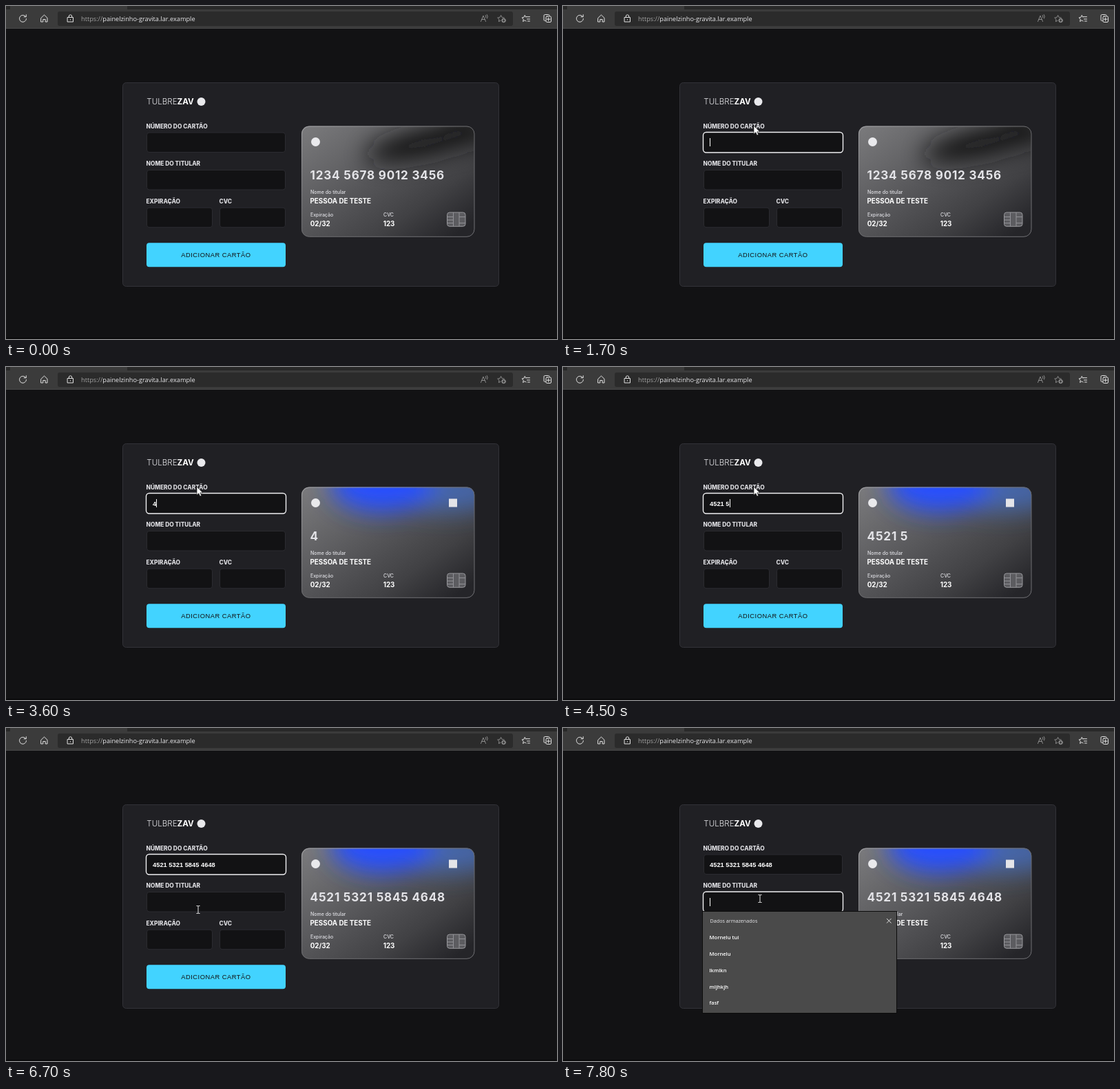
Animation, 800 px wide and 484 px high, one loop 8 s. Source, as an HTML page:

```html
<!DOCTYPE html>
<html lang="pt-BR">
<head>
<meta charset="utf-8">
<title>Formulário de cartão</title>
<style>
  html, body { margin: 0; width: 100%; height: 100%; overflow: hidden; background: #121214; }
  svg { display: block; width: 100vw; height: 100vh; }
  text { font-family: Inter, sans-serif; fill: #e9e9ec; white-space: pre; }
  .browser text { font-family: "Open Sans", "Noto Sans", sans-serif; }
  .label text { font-size: 8.4px; font-weight: 800; fill: #dcdce0; }
  .caption { font-size: 7px; font-weight: 500; fill: #e1e1e6; }
  .value { font-size: 9.8px; font-weight: 700; fill: #fff; }
  #cardNumber { font-size: 17.1px; font-weight: 700; letter-spacing: .78px; fill: #e4e4e8; }
  #typed { font: bold 9.33px "Liberation Sans", Arial, sans-serif; fill: #fff; }
  .button { font: 9.33px "Liberation Sans", Arial, sans-serif; letter-spacing: .5px; fill: #121214; }
  .icon { fill: none; stroke: #e2e2e2; stroke-width: 1; stroke-linecap: round; stroke-linejoin: round; }
  .dim { stroke: #8c8c8c; }
  .field { fill: #121214; stroke: #2b2b30; }
  .option { font-size: 7.6px; font-weight: 600; fill: #fff; }
</style>
</head>
<body>
<svg viewBox="0 0 800 484" preserveAspectRatio="none">
  <defs>
    <linearGradient id="metal" gradientUnits="userSpaceOnUse" x1="429" y1="175" x2="580" y2="385">
      <stop offset="0" stop-color="#7b7b7d"/>
      <stop offset=".5" stop-color="#545457"/>
      <stop offset=".75" stop-color="#414144"/>
      <stop offset="1" stop-color="#252529"/>
    </linearGradient>
    <linearGradient id="edge" x1="0" y1="0" x2="1" y2="1">
      <stop offset="0" stop-color="#a6a6a9"/>
      <stop offset=".5" stop-color="#69696c"/>
      <stop offset="1" stop-color="#707074"/>
    </linearGradient>
    <filter id="blur" x="-60%" y="-120%" width="220%" height="340%"><feGaussianBlur stdDeviation="17"/></filter>
    <clipPath id="cardShape"><rect x="429" y="174.5" width="251" height="161" rx="11"/></clipPath>
  </defs>

  <rect width="800" height="484" fill="#121214"/>
  <rect y="482" width="800" height="2" fill="#0b0b0c"/>

  <g class="browser">
    <rect width="800" height="33" fill="#3b3b3b"/>
    <path d="M0 0H6V5H0ZM176 0H800V5H176Z" fill="#292929"/>
    <rect y="32" width="800" height="1" fill="#484848"/>
    <rect x="75" y="8" width="661" height="21" rx="3" fill="#2b2b2b"/>
    <text x="109" y="21.6" font-size="9.2" font-weight="500" fill="#fff"><tspan font-weight="400" fill="#a0a0a0">https://</tspan>painelzinho-gravita.lar.example</text>
    <g class="icon">
      <path d="M28.6 15.4A5 5 0 1 0 29.5 18.5M29.3 12.7V15.8H26.2"/>
      <path d="M51 17.3L55.5 13L60 17.3V23H57.2V19.5H53.8V23H51Z"/>
      <path d="M89.5 16.5H97.5V23H89.5ZM91.3 16.5V15A2.2 2.2 0 0 1 95.7 15V16.5M93.5 19.5V20"/>
      <path d="M755 15.7H760.5M756.5 19H760.5M757.5 22H760.5M755.2 22L753.2 20.8L750.6 22.5L751.3 19.2L749 17L752 16.4L753.3 13.4L754.6 16"/>
      <path d="M783.5 21.5H782.5Q781 21.5 781 20V14Q781 12.5 782.5 12.5H787.5Q789 12.5 789 14M785.5 15H790Q791.5 15 791.5 16.5V22Q791.5 23.5 790 23.5H785.5Q784 23.5 784 22V16.5Q784 15 785.5 15ZM787.7 17V21.5M785.5 19.2H790"/>
    </g>
    <g class="icon dim">
      <path d="M689.5 22.5L693 14L696.5 22.5M690.7 19.5H695.3M696.3 13.5Q697.5 15 696.6 16.8M698.3 12.5Q700.4 15 698.6 18"/>
      <path d="M718 21.2L715.4 22.7L716 19.4L713.7 17.1L717 16.6L718.6 13.5L720.2 16.6L723.3 17.1"/>
      <circle cx="722.6" cy="21" r="2.8" fill="#8c8c8c"/>
      <path d="M721.2 21H724M722.6 19.6V22.4" stroke="#2b2b2b"/>
    </g>
  </g>

  <rect x="169.5" y="111.5" width="546" height="296" rx="5" fill="#202024" stroke="#323238"/>
  <text x="204.3" y="143" font-size="11.6" font-weight="300" fill="#a9a9ae">TULBRE<tspan font-weight="700" fill="#fff">ZAV</tspan></text>
  <circle cx="283.5" cy="139" r="6" fill="#e9e9ec"/>

  <g class="label">
    <text x="203.5" y="177.6">NÚMERO DO CARTÃO</text>
    <text x="203.5" y="232.2">NOME DO TITULAR</text>
    <text x="203.5" y="286.8">EXPIRAÇÃO</text>
    <text x="309.5" y="286.8">CVC</text>
  </g>
  <rect class="field" x="204.5" y="184" width="201" height="28.5" rx="3.5"/>
  <rect class="field" x="204.5" y="238.5" width="201" height="28.5" rx="3.5"/>
  <rect class="field" x="204.5" y="293.2" width="95" height="28.5" rx="3.5"/>
  <rect class="field" x="310.5" y="293.2" width="95" height="28.5" rx="3.5"/>
  <rect id="focusRing" x="203.5" width="203" height="29.5" rx="4.5" fill="#121214" stroke="#f0f0f2" stroke-width="1.4"/>
  <text id="typed" x="213" y="201.5"></text>
  <rect x="204" y="344.2" width="202" height="35" rx="4" fill="#42d3ff"/>
  <text class="button" x="254.3" y="364.6">ADICIONAR CARTÃO</text>

  <g clip-path="url(#cardShape)">
    <rect x="429" y="174" width="252" height="162" fill="url(#metal)"/>
    <g id="plainGlow" filter="url(#blur)" fill="#131316">
      <ellipse cx="608" cy="199" rx="88" ry="20" transform="rotate(-13 608 199)"/>
      <ellipse cx="672" cy="180" rx="40" ry="24" opacity=".7"/>
    </g>
    <g id="blueGlow" filter="url(#blur)">
      <ellipse cx="638" cy="180" rx="82" ry="30" fill="#416bc0" opacity=".8"/>
      <ellipse cx="546" cy="171" rx="74" ry="40" fill="#2650ff"/>
    </g>
  </g>
  <rect x="429.5" y="175" width="250.5" height="160.3" rx="11" fill="none" stroke="url(#edge)"/>
  <circle cx="449.5" cy="197.5" r="6.5" fill="#e9e9ec"/>
  <rect id="brand" x="643" y="191.5" width="12" height="12" fill="#e4e4e8"/>
  <text id="cardNumber" x="441.6" y="252"></text>
  <text class="caption" x="442" y="273">Nome do titular</text>
  <text class="value" x="441.5" y="287">PESSOA DE TESTE</text>
  <text class="caption" x="442" y="305.6">Expiração</text>
  <text class="value" x="441.7" y="319.8">02/32</text>
  <text class="caption" x="548" y="305.6">CVC</text>
  <text class="value" x="547.7" y="319.8">123</text>
  <rect x="640.5" y="300" width="26.5" height="20.3" rx="3.5" fill="#5c5c60" stroke="#98989c"/>
  <path d="M649.5 300V320M658 300V320M641 306.5H649.5M641 311H649.5M641 315.5H649.5M658 306.5H667M658 315.5H667" fill="none" stroke="#98989c" stroke-width=".9"/>

  <g id="suggestions" class="browser">
    <rect x="202.5" y="266.5" width="282" height="148" fill="#4a4a4a" stroke="#0c0c0c"/>
    <text x="213.5" y="282.8" font-size="7.2" fill="#b4b4b4">Dados armazenados</text>
    <path class="icon" d="M470.3 277.3L476.3 283.3M476.3 277.3L470.3 283.3"/>
    <text class="option" x="212.5" y="307">Mornelu tui</text>
    <text class="option" x="212.5" y="331">Mornelu</text>
    <text class="option" x="212.5" y="355">lkmlkn</text>
    <text class="option" x="212.5" y="378.6">mljhkjh</text>
    <text class="option" x="212.5" y="402.4">fasf</text>
  </g>

  <rect id="caret" width="1" height="12" fill="#fff"/>
  <g id="pointer">
    <path id="arrow" d="M0 0V12.2L2.8 9.6L4.7 13.8L6.7 12.9L4.9 8.8H8.8Z" fill="#fff" stroke="#1a1a1a" stroke-width=".7"/>
    <path id="beam" d="M-2.5 -5.5H-.8L0 -5L.8 -5.5H2.5M0 -5V5M-2.5 5.5H-.8L0 5L.8 5.5H2.5" fill="none" stroke="#e6e6e6"/>
  </g>
</svg>
<script>
  const LOOP = 8000, TICK = 100, BLINK = 500;
  const FOCUS_NUMBER = 700, FOCUS_NAME = 6800, SHOW_LIST = 6900;
  const NUMBER = "4521 5321 5845 4648", PLACEHOLDER = "1234 5678 9012 3456";

  // [time, characters typed so far]
  const keys = [[3600, 1], [3900, 2], [4100, 3], [4300, 4], [4500, 6], [4700, 8], [4800, 9],
    [5200, 12], [5400, 13], [5600, 14], [5700, 17], [5800, 18], [6000, 19]];

  // [time, x, y] of the pointer hotspot
  const path = [[100, 440, 300], [300, 345, 248], [600, 264.5, 193], [1100, 264.5, 193],
    [1300, 277, 174], [6300, 277, 174], [6400, 278, 190], [6600, 279, 250], [6700, 279, 264],
    [6800, 281, 256], [7000, 284, 250], [7100, 284, 250], [7300, 286, 248]];

  const fields = [[204, 184, 406, 212], [204, 238, 406, 267], [204, 293, 300, 322], [310, 293, 406, 322]];

  const el = id => document.getElementById(id);
  const show = (id, visible) => el(id).setAttribute("visibility", visible ? "visible" : "hidden");
  const place = (id, x, y) => {
    el(id).setAttribute("x", x);
    el(id).setAttribute("y", y);
  };

  function pointerAt(t) {
    const next = path.findIndex(p => p[0] > t);
    if (next < 0) return path[path.length - 1].slice(1);
    if (next === 0) return path[0].slice(1);
    const [t0, x0, y0] = path[next - 1], [t1, x1, y1] = path[next];
    const k = (t - t0) / (t1 - t0);
    return [x0 + (x1 - x0) * k, y0 + (y1 - y0) * k];
  }

  function drawPointer(t) {
    const [x, y] = pointerAt(t);
    const overField = fields.some(([l, top, r, b]) => x >= l && x <= r && y >= top && y <= b);
    el("pointer").setAttribute("transform", `translate(${x} ${y})`);
    show("arrow", t >= path[0][0] && !overField);
    show("beam", t >= path[0][0] && overField);
  }

  function drawForm(t) {
    const pressed = keys.filter(k => k[0] <= t);
    const [lastKey, count] = pressed.length ? pressed[pressed.length - 1] : [0, 0];
    const onName = t >= FOCUS_NAME;

    el("typed").textContent = NUMBER.slice(0, count);
    el("cardNumber").textContent = count ? NUMBER.slice(0, count) : PLACEHOLDER;
    show("plainGlow", !count);
    show("blueGlow", count);
    show("brand", count);

    show("focusRing", t >= FOCUS_NUMBER);
    place("focusRing", 203.5, onName ? 238 : 183.5);
    show("suggestions", t >= SHOW_LIST);

    const blinkStart = onName ? FOCUS_NAME : Math.max(FOCUS_NUMBER, lastKey);
    show("caret", t >= blinkStart && (t - blinkStart) % (2 * BLINK) < BLINK);
    const textWidth = count && !onName ? el("typed").getComputedTextLength() : 0;
    place("caret", 213 + Math.round(textWidth), onName ? 247 : 192);
  }

  function frame() {
    const t = Math.floor(performance.now() % LOOP / TICK) * TICK;
    drawForm(t);
    drawPointer(t);
    requestAnimationFrame(frame);
  }
  frame();
</script>
</body>
</html>
```
